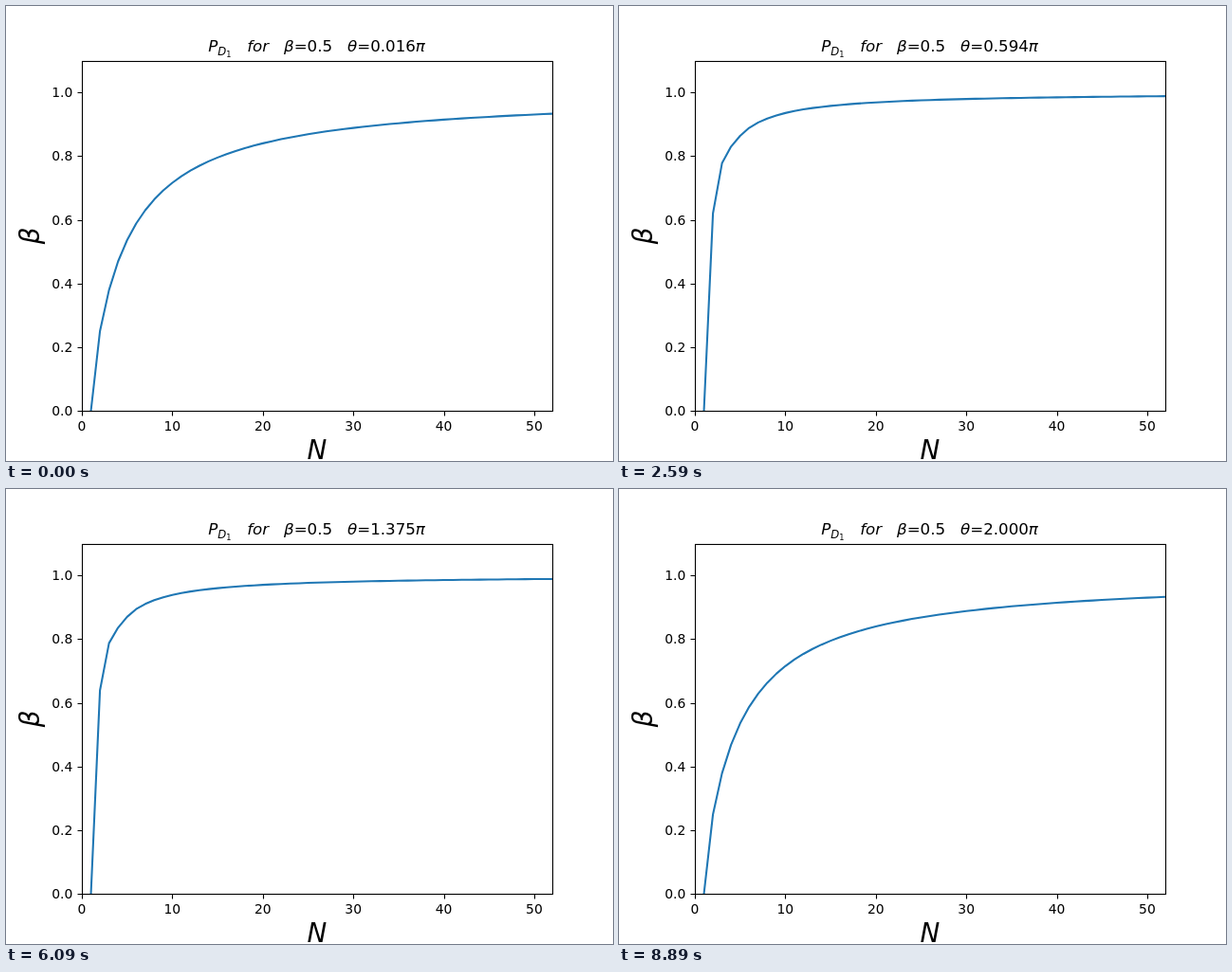
Recreate the animation shown at these times as an HTML page. Size 640 by 480 pixels, loop 8960 ms.

```html
<!DOCTYPE html>
<html lang="en">
<head>
<meta charset="utf-8">
<title>Detection amplitude</title>
<style>
  html, body { margin: 0; width: 100%; height: 100%; overflow: hidden; background: #fff; }
  svg { display: block; width: 640px; height: 480px; }
  text { font: 13.89px "DejaVu Sans", sans-serif; white-space: pre; }
  .title { font-size: 16.67px; }
  .axis { font-size: 27.78px; font-style: oblique; text-anchor: middle; }
  .var { font-style: oblique; }
  .frame { fill: none; stroke: #000; stroke-width: 1.11; }
</style>
</head>
<body>
<svg viewBox="0 0 640 480">
  <clipPath id="area"><rect x="80" y="57.6" width="496" height="369.6"/></clipPath>
  <path id="curve" clip-path="url(#area)" fill="none" stroke="#1f77b4" stroke-width="2.083" stroke-linejoin="round"/>
  <rect class="frame" x="80.5" y="58.5" width="496" height="369"/>
  <path id="ticks" class="frame"/>
  <g id="labels"></g>
  <text class="title" y="48"><tspan class="var" x="213.3">P</tspan><tspan class="var" x="223.3" y="51.5" font-size="11.67">D</tspan><tspan x="232.3" y="54" font-size="8.17">1</tspan><tspan class="var" x="254.2" y="48">for</tspan><tspan class="var" x="293">β</tspan>=0.5<tspan class="var" x="360">θ</tspan>=<tspan id="angle"></tspan><tspan class="var">π</tspan></text>
  <text class="axis" x="328" y="478">N</text>
  <text class="axis" transform="translate(35 242.4) rotate(-90)">β</text>
</svg>
<script>
const STEP = 70, COUNT = 128, BETA = 0.5;
const $ = id => document.getElementById(id);
const px = n => 80 + n * 496 / 52;
const py = p => 427.2 - p * 336;
const snap = v => Math.round(v) + 0.5;

function addLabel(str, x, y, anchor) {
  const label = document.createElementNS("http://www.w3.org/2000/svg", "text");
  label.textContent = str;
  label.setAttribute("x", x);
  label.setAttribute("y", y);
  label.setAttribute("text-anchor", anchor);
  $("labels").append(label);
}

function drawAxes() {
  let d = "";
  for (let n = 0; n <= 50; n += 10) {
    d += `M${snap(px(n))} 427.5v5`;
    addLabel(n, px(n), 448, "middle");
  }
  for (let i = 0; i <= 5; i++) {
    const y = py(i / 5);
    d += `M80.5 ${snap(y)}h-5`;
    addLabel((i / 5).toFixed(1), 70.3, Math.round(y) + 5, "end");
  }
  $("ticks").setAttribute("d", d);
}

// Modulus of the upper-arm amplitude after n rotations by pi/2n,
// where the lower arm is multiplied by BETA * exp(i theta) each time.
function amplitude(n, theta) {
  const c = Math.cos(Math.PI / 2 / n), s = Math.sin(Math.PI / 2 / n);
  const tr = BETA * Math.cos(theta), ti = BETA * Math.sin(theta);
  let ar = 1, ai = 0, br = 0, bi = 0;
  for (let k = 0; k < n; k++) {
    const ur = s * ar + c * br, ui = s * ai + c * bi;
    ar = c * ar - s * br;
    ai = c * ai - s * bi;
    br = tr * ur - ti * ui;
    bi = tr * ui + ti * ur;
  }
  return Math.hypot(ar, ai);
}

// Three decimals, ties to even
function format(v) {
  const m = v * 1000, low = Math.floor(m);
  const whole = m - low === 0.5 ? low + low % 2 : Math.round(m);
  return (whole / 1000).toFixed(3);
}

let shown = -1;
function draw(now) {
  const step = Math.floor(now / STEP) % COUNT;
  if (step !== shown) {
    shown = step;
    const turns = (step + 1) / 64;
    const points = [];
    for (let n = 1; n <= 53; n++) {
      points.push(`${px(n).toFixed(2)} ${py(amplitude(n, turns * Math.PI)).toFixed(2)}`);
    }
    $("curve").setAttribute("d", "M" + points.join("L"));
    $("angle").textContent = format(turns);
  }
  requestAnimationFrame(() => draw(performance.now() - start));
}

drawAxes();
const start = performance.now();
draw(0);
</script>
</body>
</html>
```
